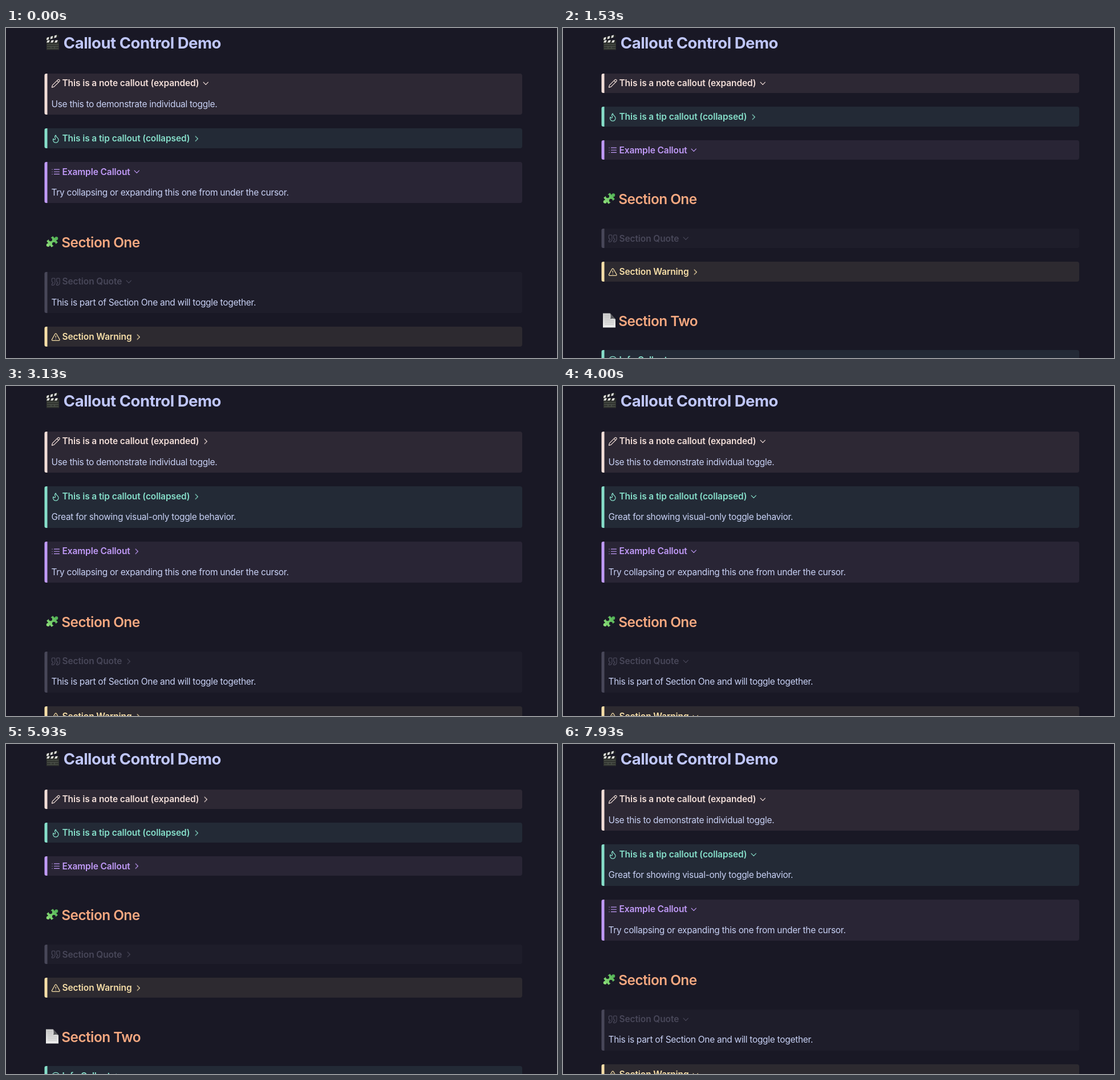
Animation, 966 px wide and 579 px high, one loop 8270 ms. Source, as an HTML page:

```html
<!DOCTYPE html>
<html lang="en">
<head>
<meta charset="utf-8">
<title>Callout Control Demo</title>
<style>
html, body { margin: 0; width: 100%; height: 100%; overflow: hidden; background: #191825; }
body {
  position: relative;
  font: 15.5px/24px Inter, "Liberation Sans", sans-serif;
  font-optical-sizing: none;
  letter-spacing: -.3px;
  color: #c8d1f5;
  white-space: nowrap;
  -webkit-font-smoothing: antialiased;
}
main { position: absolute; left: 67px; top: 79.7px; width: 838px; }
h1, h2 { position: relative; margin: 0; }
h1 {
  position: absolute; left: 67.5px; top: 6px; padding-left: 33.3px;
  font-size: 27.5px; line-height: 40px; font-weight: 700; letter-spacing: -.48px; color: #bfc6fa;
}
h2 {
  padding: 0 0 6.4px 30.3px;
  font-size: 24.4px; line-height: 90px; font-weight: 600; letter-spacing: -.57px; color: #f5a880;
}
.emoji { position: absolute; left: 0; width: 28px; height: 28px; }
h1 .emoji { top: 5.5px; }
h2 .emoji { top: 29.5px; left: .5px; }

/* The gradient gives the bar its soft half-pixel edges. */
.callout {
  margin-bottom: 24px; padding-left: 12px; border-radius: 4px;
  background: linear-gradient(90deg, transparent, var(--tint) 1px 5px, var(--fill) 6px);
}
.title {
  box-sizing: border-box; display: flex; align-items: center; height: 34.6px; padding-top: 1px;
  font-weight: 600; letter-spacing: -.1px; color: var(--tint);
}
.icon, .chevron {
  flex: none; width: 16.5px; height: 16.5px; fill: none; stroke: currentColor;
  stroke-width: 1.75; stroke-linecap: round; stroke-linejoin: round;
}
.icon { margin: 0 2.7px 0 .3px; }
.chevron { margin-left: 3.7px; animation: turn 8270ms step-end infinite; }
.body { height: 37.9px; overflow: hidden; animation: fold 8270ms step-end infinite; }
.body p { margin: 0; padding: 7.3px 0 0 .5px; }
.shut .chevron { animation-name: turn-shut; }
.shut .body { animation-name: fold-shut; }

.note { --tint: #f2ded8; --fill: #2d2834; }
.tip { --tint: #86dfca; --fill: #232a36; }
.example { --tint: #c09af7; --fill: #292535; }
.quote { --tint: #484759; --fill: #1e1d2a; }
.warning { --tint: #f7dfa8; --fill: #2d2a30; }

/* The layout snaps first, the chevrons follow. */
@keyframes fold {
  0% { height: 37.9px }
  18.5% { height: 0 }
  37.847% { height: 37.9px }
  57.194% { height: 0 }
  78.234%, 100% { height: 37.9px }
}
@keyframes fold-shut {
  0% { height: 0 }
  37.847% { height: 37.9px }
  57.194% { height: 0 }
  78.234%, 100% { height: 37.9px }
}
@keyframes turn {
  0% { transform: rotate(0deg) }
  19.347% { transform: rotate(-63deg) }
  20.193% { transform: rotate(-90deg) }
  38.694% { transform: rotate(-27deg) }
  39.54% { transform: rotate(0deg) }
  58.041% { transform: rotate(-63deg) }
  58.887% { transform: rotate(-90deg) }
  78.96% { transform: rotate(-27deg) }
  79.806%, 100% { transform: rotate(0deg) }
}
@keyframes turn-shut {
  0% { transform: rotate(-90deg) }
  38.694% { transform: rotate(-27deg) }
  39.54% { transform: rotate(0deg) }
  58.041% { transform: rotate(-63deg) }
  58.887% { transform: rotate(-90deg) }
  78.96% { transform: rotate(-27deg) }
  79.806%, 100% { transform: rotate(0deg) }
}
</style>
</head>
<body>
<svg width="0" height="0" style="position:absolute">
  <defs>
    <linearGradient id="leaf" x1="0" y1="0" x2="1" y2="0">
      <stop offset="0" stop-color="#8fe07a"/><stop offset="1" stop-color="#4fb054"/>
    </linearGradient>
    <linearGradient id="paper" x1="0" y1="0" x2="0" y2="1">
      <stop offset="0" stop-color="#c9c9c9"/><stop offset="1" stop-color="#efefef"/>
    </linearGradient>
  </defs>
  <symbol id="down" viewBox="0 0 24 24"><path d="m6 9 6 6 6-6"/></symbol>
  <symbol id="pencil" viewBox="0 0 24 24"><path d="M17 3a2.85 2.83 0 1 1 4 4L7.500 20.500 2 22l1.500-5.500ZM15 5l4 4"/></symbol>
  <symbol id="flame" viewBox="0 0 24 24"><path d="M8.500 14.500A2.500 2.500 0 0 0 11 12c0-1.380-.5-2-1-3-1.070-2.140-.220-4.050 2-6 .5 2.500 2 4.900 4 6.500s3 3.500 3 5.500a7 7 0 1 1-14 0c0-1.150.430-2.290 1-3a2.500 2.500 0 0 0 2.500 2.500z"/></symbol>
  <symbol id="list" viewBox="0 0 24 24"><path d="M8 6h13M8 12h13M8 18h13M3 6h.01M3 12h.01M3 18h.01"/></symbol>
  <symbol id="marks" viewBox="0 0 24 24">
    <path id="mark" d="M3 21c3 0 7-1 7-8V5c0-1.250-.76-2-2-2H4c-1.250 0-2 .75-2 2v6c0 1.250.75 2 2 2 1 0 1 0 1 1v1c0 1-1 2-2 2s-1 0-1 1v2c0 1 0 1 1 1z"/>
    <use href="#mark" x="12"/>
  </symbol>
  <symbol id="alert" viewBox="0 0 24 24"><path d="m21.730 18-8-14a2 2 0 0 0-3.480 0l-8 14A2 2 0 0 0 4 21h16a2 2 0 0 0 1.730-3ZM12 9v4M12 17h.01"/></symbol>
  <symbol id="info" viewBox="0 0 24 24"><circle cx="12" cy="12" r="10"/><path d="M12 16v-4M12 8h.01"/></symbol>
</svg>

<h1>
  <svg class="emoji" viewBox="0 0 28 28">
    <path d="M3 12h22v14.500H3z" fill="#30332f"/>
    <path d="M4 17h20M4 20.500h20M4 24h20M11 20.500v3.500M17 20.500v3.500" stroke="#5c625a" stroke-width=".8"/>
    <g id="stick">
      <path d="M2.500 9.500h23v4h-23z" fill="#262826"/>
      <path d="M5 9.500h4l-2 4H3zM12 9.500h4l-2 4H10zM19 9.500h4l-2 4H17z" fill="#e6e6e2"/>
    </g>
    <use href="#stick" transform="rotate(-15 2 10) translate(0 -4)"/>
  </svg>Callout Control Demo</h1>

<main>
  <section class="callout note">
    <div class="title"><svg class="icon"><use href="#pencil"/></svg>This is a note callout (expanded)<svg class="chevron"><use href="#down"/></svg></div>
    <div class="body"><p>Use this to demonstrate individual toggle.</p></div>
  </section>
  <section class="callout tip shut">
    <div class="title"><svg class="icon"><use href="#flame"/></svg>This is a tip callout (collapsed)<svg class="chevron"><use href="#down"/></svg></div>
    <div class="body"><p>Great for showing visual-only toggle behavior.</p></div>
  </section>
  <section class="callout example">
    <div class="title"><svg class="icon"><use href="#list"/></svg>Example Callout<svg class="chevron"><use href="#down"/></svg></div>
    <div class="body"><p>Try collapsing or expanding this one from under the cursor.</p></div>
  </section>

  <h2>
    <svg class="emoji" viewBox="0 0 28 28">
      <path transform="translate(-1) rotate(-38 14 14)" fill="url(#leaf)"
        d="M7 7h5a3 3 0 1 0 4 0h5v5a3 3 0 1 1 0 4v5h-5a3 3 0 1 0-4 0H7v-5a3 3 0 1 1 0-4z"/>
    </svg>Section One</h2>
  <section class="callout quote">
    <div class="title"><svg class="icon"><use href="#marks"/></svg>Section Quote<svg class="chevron"><use href="#down"/></svg></div>
    <div class="body"><p>This is part of Section One and will toggle together.</p></div>
  </section>
  <section class="callout warning shut">
    <div class="title"><svg class="icon"><use href="#alert"/></svg>Section Warning<svg class="chevron"><use href="#down"/></svg></div>
    <div class="body"></div>
  </section>

  <h2>
    <svg class="emoji" viewBox="0 0 28 28">
      <path d="M2 1.500h12.500L24 12v14.500H2z" fill="url(#paper)"/>
      <path d="M5 6h8M5 9h8M5 12h9M5 15h16M5 18h16M5 21h16" stroke="#b4b4b4" stroke-width=".7"/>
      <path d="M14.500 1.500 24 12c-3-1.500-6-1.500-9-.5 1-3.500 1-7-.5-10z" fill="#55565a"/>
    </svg>Section Two</h2>
  <section class="callout tip">
    <div class="title"><svg class="icon"><use href="#info"/></svg>Info Callout<svg class="chevron"><use href="#down"/></svg></div>
    <div class="body"></div>
  </section>
</main>
</body>
</html>
```
